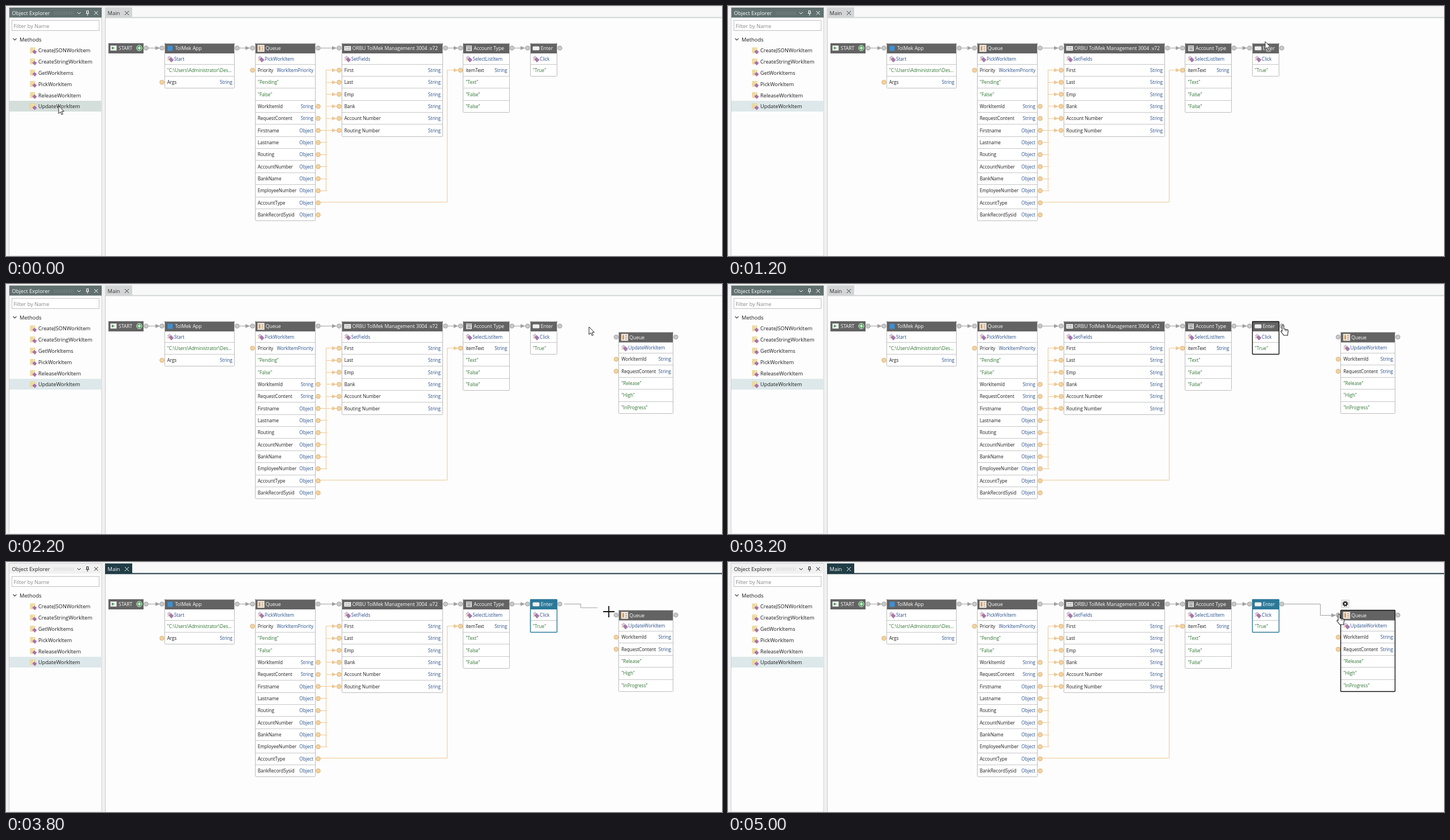
An HTML page that plays this animation: 1265x443 px, repeating every 5200 ms.

```html
<!DOCTYPE html>
<html lang="en">
<head>
<meta charset="utf-8">
<style>
html, body { margin: 0; width: 100%; height: 100%; overflow: hidden; background: #fdfdfd; }
svg { display: block; width: 1265px; height: 443px; font-family: "Open Sans", "Noto Sans", sans-serif; }
text { white-space: pre; }
</style>
</head>
<body>
<svg id="stage" viewBox="0 0 1265 443"></svg>
<script>
const LOOP = 5200, STEP = 200;
const GREY = '#636363', BLUE = '#2c7898', LINK = '#234b85', GREEN = '#2c722f', INK = '#1c1c1c';
const ORANGE = '#ecc999', WIRE = '#a0a0a0', FRAME = '#f1f1f1';
const HEAD = 37.1, ROW = 21.36;

const rect = (x, y, w, h, fill, extra = '') =>
  `<rect x="${x}" y="${y}" width="${w}" height="${h}" fill="${fill}" ${extra}/>`;
const path = (d, stroke, width = 1, fill = 'none') =>
  `<path d="${d}" fill="${fill}" stroke="${stroke}" stroke-width="${width}"/>`;
const text = (x, y, s, size, fill = INK, anchor = 'start') =>
  `<text x="${x}" y="${y}" font-size="${size}" fill="${fill}" text-anchor="${anchor}">${s}</text>`;
const at = (x, y, s) => `<g transform="translate(${x} ${y})">${s}</g>`;
const dot = (x, y, data) =>
  `<circle cx="${x}" cy="${y}" r="3.8" fill="${data ? '#f3d3a2' : '#c9c9c9'}" stroke="${data ? '#dcb274' : '#a0a0a0'}"/>`;
const arrow = (x, y, color) => path(`M${x - 12} ${y - 3.5}l8 3.5-8 3.5z`, 'none', 0, color);
const snap = v => Math.floor(v) + .5;

// Small icons, centred on 0,0
const methodIcon =
  path('M-5-2l4-3 3 3-4 3z', '#b9a0c0', .7, '#dcc6df') +
  path('M-2 1l4-3 4 4-4 4z', '#8d5c99', .7, '#a878b2') + rect(-5, 1, 3, 2, '#e3cb84');
const treeIcon =
  rect(-5, -5, 8, 9, '#f8ebbd', 'stroke="#dcc06f" stroke-width=".7"') +
  path('M-5-2h8M-5 1h8M-2-5v9', '#dcc06f', .7) +
  path('M-1 2l3-3 4 3-3 4z', '#8d4f9c', .6, '#b06cba');
const nodeIcons = {
  app: rect(-5, -4.5, 9, 9, '#3f8fd2'),
  queue: rect(-6, -6, 12, 12, '#f5eee6', 'stroke="#c9b9a6" stroke-width=".7"') +
    rect(-4, -4, 3, 8, '#dd9850') + path('M1-3h3M1 0h3M1 3h3', '#777', 1.2),
  form: rect(-6, -4, 12, 8, '#eee') + path('M-4-1.5h3M0-1.5h4M-4 1.5h3M0 1.5h4', '#888'),
  list: rect(-5, -5, 10, 10, '#ddd') + path('M-4-3h8M-3 0h6M-3 2.5h6', '#666'),
  button: rect(-6, -3.5, 12, 7, '#eee', 'rx="1.5"')
};

// Rows: label|type|sockets (i = input, o = output); rows without a type are literals
const nodes = [
  { x: 280, w: 124, icon: 'app', title: 'TolMek App', method: 'Start',
    rows: ['"C:\\Users\\Administrator\\Des...', 'Args|String|i'] },
  { x: 440, w: 107, icon: 'queue', title: 'Queue', method: 'PickWorkItem',
    rows: ['Priority|WorkItemPriority|i', '"Pending"', '"False"', 'WorkItemId|String|o', 'RequestContent|String|o',
      ...['Firstname', 'Lastname', 'Routing', 'AccountNumber', 'BankName', 'EmployeeNumber', 'AccountType',
        'BankRecordSysid'].map(s => s + '|Object|o')] },
  { x: 593, w: 179, icon: 'form', title: 'ORBU TolMek Management 3004 .v72', method: 'SetFields',
    rows: ['First', 'Last', 'Emp', 'Bank', 'Account Number', 'Routing Number'].map(s => s + '|String|i') },
  { x: 807.5, w: 82, icon: 'list', title: 'Account Type', method: 'SelectListItem',
    rows: ['itemText|String|i', '"Text"', '"False"', '"False"'] },
  { x: 926, w: 48, icon: 'button', title: 'Enter', method: 'Click', rows: ['"True"'] }
];
const updateNode = { x: 1082.5, w: 96.5, y: 85.5, icon: 'queue', title: 'Queue', method: 'UpdateWorkItem',
  rows: ['WorkItemId|String|i', 'RequestContent|String|i', '"Release"', '"High"', '"InProgress"'] };

function drawNode({ x, w, y = 66, icon, title, method, rows }, state = '') {
  const top = y + HEAD, left = snap(x), right = snap(x + w - .5), bottom = snap(top + rows.length * ROW);
  const color = state === 'selected' ? BLUE : GREY;
  let s = rect(left, y, right - left, bottom - y, '#fff') + rect(x, y, w, 18, color) +
    at(x + 10.5, y + 9, nodeIcons[icon]) + text(x + 18.7, y + 12.2, title, 8.65, '#fff') +
    at(x + 10, y + 27.5, methodIcon) + text(x + 17, y + 30.5, method, 8.15, LINK);
  rows.forEach((row, i) => {
    const [label, type, socket] = row.split('|'), ry = top + i * ROW, mid = ry + ROW / 2;
    s += path(`M${left} ${snap(ry)}H${right}`, '#c6c6c6') + text(x + 4.7, mid + 3.1, label, 8.15, type ? INK : GREEN);
    if (type) s += text(x + w - 4, mid + 3.1, type, 8.15, LINK, 'end');
    if (socket) s += dot(socket === 'i' ? x - 4.5 : x + w + 4.5, mid, true);
  });
  const border = { hover: '#111', selected: BLUE }[state] || '#bcbcbc';
  return s + rect(left, snap(y), right - left, bottom - snap(y), 'none',
    `stroke="${border}" stroke-width="${state ? 1.4 : 1}" rx="1"`) +
    dot(x - 4.5, y + 8.5) + dot(x + w + 4.5, y + 8.5);
}

function drawWires() {
  const rowY = i => 66 + HEAD + (i + .5) * ROW;
  let s = path('M248 74.5h28M408 74.5h27M551 74.5h37M776 74.5h27M893 74.5h28', WIRE);
  for (const x of [276, 435, 588, 803, 921]) s += arrow(x, 74.5, WIRE);
  s += path(`M565.5 ${rowY(0)}V${rowY(10)}`, ORANGE);
  for (let i = 0; i < 6; i++)
    s += path(`M565 ${snap(rowY(i))}h20M555 ${snap(rowY(i + 5))}h12.5`, ORANGE) + arrow(588, rowY(i), ORANGE);
  return s + path(`M555 ${snap(rowY(11)) - 1}H779.5V${snap(rowY(0))}H800`, ORANGE) + arrow(803, rowY(0), ORANGE);
}

function drawPanel(active, hovering) {
  const ink = active ? '#fff' : '#222';
  let s = rect(0, 0, 1265, 20, '#f8f8f8') + rect(0, 0, 1265, 2, FRAME) + rect(0, 0, 175, 443, FRAME) +
    rect(5.5, 2.5, 163.5, 440.5, '#fdfdfd', 'stroke="#d0d0d0"') +
    rect(6, 3, 163, 17.5, active ? '#60706f' : FRAME) +
    text(10.5, 15.7, 'Object Explorer', 9.3, ink);
  for (const y of [10.5, 12.5, 14.5])
    s += `<path d="M85 ${y}h34" stroke="${active ? '#8d9a99' : '#bbb'}" stroke-dasharray="1 2"/>`;
  s += path('M126 11l3 3 3-3M156 9l6.5 6.5M162.5 9l-6.5 6.5M142 8.5h4M142.5 8.5v4.5M145.5 8.5v4.5M141 13h6M144 13v4', ink) +
    rect(10.5, 25.5, 154, 18, '#fff', 'stroke="#c0c0c0"') + text(13.5, 38.5, 'Filter by Name', 9.3, '#888') +
    path('M12.5 57.5l3 3 3-3', '#444', 1.2) + text(24, 62.5, 'Methods', 9.4) +
    rect(6, 168, 162.5, 19, hovering ? '#d4dedb' : '#dde8ea');
  ['CreateJSONWorkItem', 'CreateStringWorkItem', 'GetWorkItems', 'PickWorkItem', 'ReleaseWorkItem', 'UpdateWorkItem']
    .forEach((name, i) => {
      const y = 79 + i * 19.8;
      s += at(48, y, treeIcon) + text(57, y + 3.3, name, 9.25);
    });
  const tab = active ? '#d3d6d6' : '#203c45', tabInk = active ? '#333' : '#fff';
  return s + rect(175, 20, 1090, 423, '#fdfdfd') + path('M175.5 20V443', '#c8c8c8') +
    rect(175, 2.5, 48, 18, tab) + rect(175, 19.5, 1090, 2, tab) +
    text(179.5, 15.7, 'Main', 9.4, tabInk) + path('M210 9l7 7M217 9l-7 7', tabInk);
}

const startNode = rect(181, 66, 62, 18, GREY) +
  rect(184.5, 70, 11, 9, '#eee') + path('M187 72l5 2.5-5 2.5z', 'none', 0, '#4d9a55') +
  text(199, 78.2, 'START', 8.6, '#fff') +
  '<circle cx="235.5" cy="74.5" r="4.8" fill="#4d9f58" stroke="#dfeee0"/>' +
  path('M232.5 74.5h6M235.5 71.5v6', '#fff', 1.3) + dot(247.5, 74.5);

const gear = rect(1084, 67.5, 13, 13, '#fff', 'stroke="#c4c4c4"') +
  '<circle cx="1090.5" cy="74" r="4.2" fill="none" stroke="#222" stroke-width="1.8" stroke-dasharray="1.65"/>' +
  '<circle cx="1090.5" cy="74" r="2.7" fill="#fff" stroke="#222" stroke-width="2"/>';

const cursors = {
  arrow: path('M0 0V13.5L3.2 10.6 5.3 15.5 7.5 14.5 5.4 9.8H9.5Z', '#222', 1, '#fff'),
  hand: path('M-1.5 1.2Q-1.5-.5 0-.5T1.5 1.2V6.5L7.5 8Q9.5 8.5 9.3 10.5L8.3 15.5V18H1.5L-3.5 11.5Q-4 9-1.5 10.5Z', '#222', 1.1, '#fff') +
    path('M4 7.5v3M6.5 8v3', '#222', .8),
  cross: path('M-10.5 0h21M0-10.5v21', '#fff', 3.5) + path('M-10 0h20M0-10v20', '#111', 1.8)
};
const dragBadge = rect(2, 8, 8, 10, '#ddd', 'fill-opacity=".5" stroke="#999" stroke-dasharray="1 1"');

// Pointer path: time, x, y
const keys = [[0, 93, 177], [1200, 949, 63], [1600, 1077, 82], [1800, 1077, 82], [2200, 1030, 76],
  [2800, 980.5, 73], [3400, 980.5, 73], [3800, 1065, 88], [4400, 1077, 94], [4800, 1077, 94],
  [5000, 1079.5, 93], [LOOP, 1079.5, 93]];

function pointer(t) {
  const i = keys.findIndex(k => k[0] > t), [t0, x0, y0] = keys[i - 1], [t1, x1, y1] = keys[i];
  let p = (t - t0) / (t1 - t0);
  if (i === 1) p = p * p * (3 - 2 * p);
  return [x0 + (x1 - x0) * p, y0 + (y1 - y0) * p];
}

function render(t) {
  const [x, y] = pointer(t);
  const dropped = t >= 2000, hover = t >= 2800, linking = t >= 3400, linked = t >= 5000;
  let s = drawPanel(!linking, t < 200) + drawWires() + startNode;
  s += nodes.map(n => drawNode(n, n.title !== 'Enter' ? '' : linking ? 'selected' : hover ? 'hover' : '')).join('');
  if (dropped) s += drawNode(updateNode, linked ? 'hover' : '');
  if (linked) s += path('M983 74.5H1046.5V94.5H1070', WIRE) + arrow(1078, 94.5, WIRE) + gear;
  else if (linking && x > 1010) {
    const endX = x - 20, midX = (986 + endX) / 2;
    s += path(`M986 74.5H${midX}V${y - 7}H${endX}`, WIRE);
  }
  const kind = linked || (hover && !linking) ? 'hand' : linking ? 'cross' : 'arrow';
  const dragging = t >= 200 && t < 1800;
  document.getElementById('stage').innerHTML = s + at(x, y, (dragging ? dragBadge : '') + cursors[kind]);
}

let shown = -1;
function tick() {
  const t = Math.floor(performance.now() % LOOP / STEP) * STEP;
  if (t !== shown) render(shown = t);
  requestAnimationFrame(tick);
}
tick();
</script>
</body>
</html>
```
